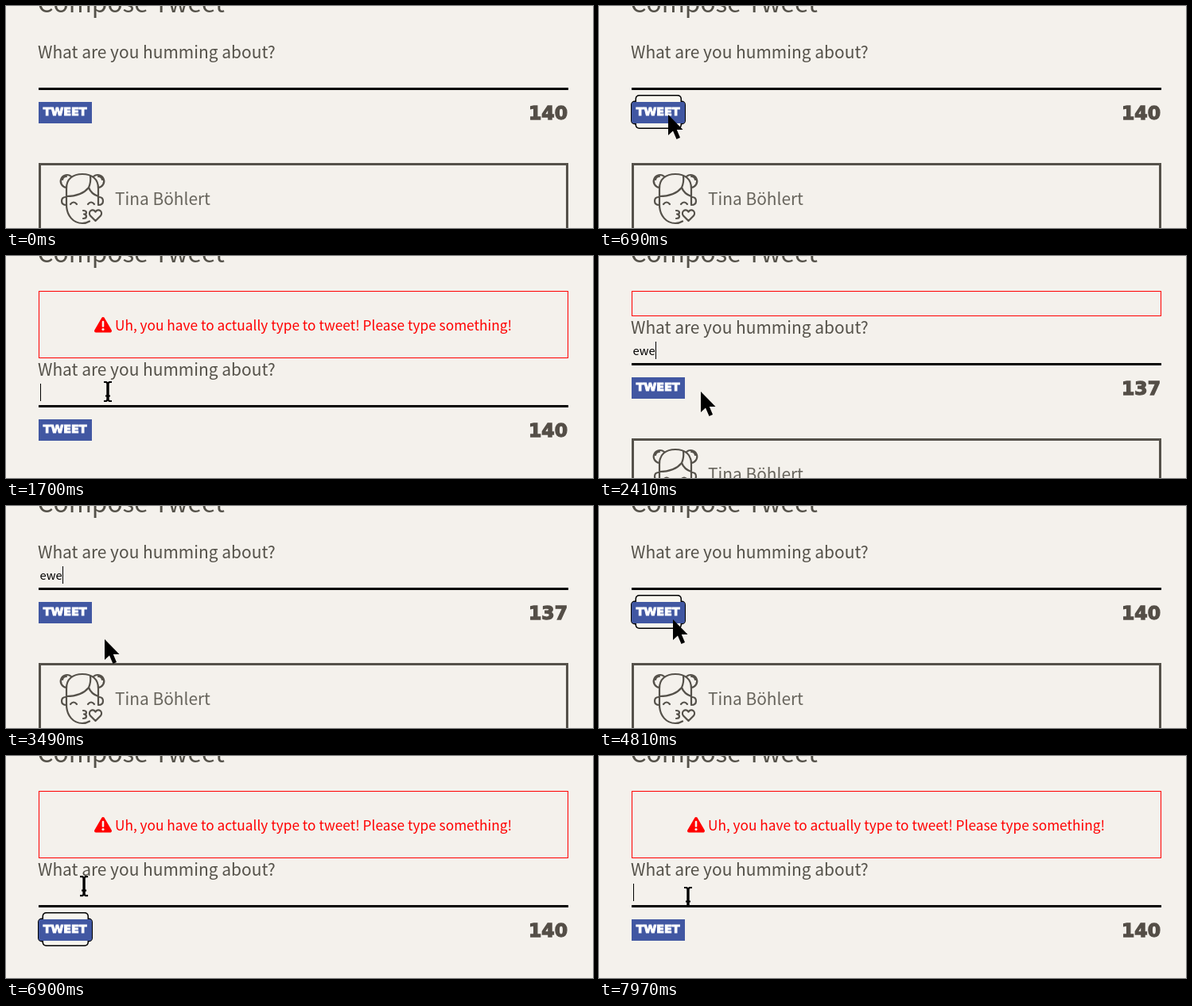
An HTML page that plays this animation: 738 px wide and 280 px high, repeating every 8000 ms.

```html
<!DOCTYPE html>
<html lang="en">
<head>
<meta charset="utf-8">
<title>Compose form</title>
<style>
  html, body { margin: 0; width: 100%; height: 100%; overflow: hidden; background: #f4f1ec; }
  svg { display: block; width: 738px; height: 280px; }
  text { font-family: "Noto Sans CJK JP", "Noto Sans CJK SC", "Noto Sans CJK", "Open Sans", sans-serif; fill: #545149; }
  .title { font-size: 31.5px; }
  .label { font-size: 20.95px; }
  .name { font-size: 20.9px; font-weight: 300; fill: #67645c; }
  .typed { font-size: 14.7px; fill: #000; }
  .warn { font-size: 17.27px; fill: #f00; }
  .block { font-family: "DejaVu Sans", sans-serif; font-weight: 700; }
  .count { font-size: 23.5px; fill: #544e47; stroke: #544e47; stroke-width: 1.3; }
  .tweet { font-size: 14.3px; fill: #fff; stroke: #fff; stroke-width: 1; }
  .art { fill: none; stroke: #55514a; stroke-width: 2.2; stroke-linecap: round; stroke-linejoin: round; }
</style>
</head>
<body>
<svg viewBox="0 0 738 280">
  <defs>
    <clipPath id="clip"><rect id="clipBox" x="41" y="44" width="666" height="0"/></clipPath>
  </defs>

  <text class="title" x="39.5" y="7.5">Compose Tweet</text>

  <g id="alert">
    <rect id="frame" x="41.5" y="44.5" width="665" height="0" fill="none" stroke="#f00"/>
    <g clip-path="url(#clip)">
      <g id="message">
        <path d="M122 79 L131 94.500 H113 Z" fill="#f00" stroke="#f00" stroke-width="4" stroke-linejoin="round"/>
        <path d="M122 83 V88.500" stroke="#f4f1ec" stroke-width="2.600" stroke-linecap="round"/>
        <circle cx="122" cy="92.500" r="1.600" fill="#f4f1ec"/>
        <text class="warn" x="137" y="94">Uh, you have to actually type to tweet! Please type something!</text>
      </g>
    </g>
  </g>

  <g id="form">
    <text class="label" x="40" y="66">What are you humming about?</text>
    <text class="typed" id="typed" x="42.500" y="93"></text>
    <rect id="caret" x="43" y="76" width="1" height="22"/>
    <rect x="41" y="103" width="666" height="3"/>

    <g id="ring">
      <rect x="40" y="119.500" width="69" height="30" rx="5"/>
      <rect x="45.500" y="112" width="58.500" height="43" rx="5"/>
      <g fill="#f8f6ef">
        <rect x="41.500" y="121" width="66" height="27" rx="4"/>
        <rect x="47" y="113.500" width="55.500" height="40" rx="4"/>
      </g>
    </g>
    <rect id="button" x="41" y="121" width="67" height="27" fill="#4157a2"/>
    <text class="block tweet" x="46.800" y="138.200">TWEET</text>
    <text class="block count" id="count" x="706" y="142.800" text-anchor="end">140</text>

    <rect x="42.500" y="199.500" width="663" height="300" fill="none" stroke="#55514a" stroke-width="3"/>
    <g class="art">
      <g id="half">
        <path d="M76 229 A8 8 0 1 1 82 215 M71 219 Q72 215 76 215"/>
        <path d="M76 250 V230 C76 218 84 212 96 212"/>
        <path d="M75 241 Q70 241 70 246 Q70 251 76 251 M81 250 Q85 245 89 250"/>
      </g>
      <use href="#half" transform="translate(192) scale(-1 1)"/>
      <path d="M76 250 C76 265 85 274 96 274 Q101 274 105 271.500"/>
      <path d="M106 214 Q107 222 104 229 M76 240 Q95 240 104 229 Q107 237 116 240"/>
      <path d="M97 258 Q101 258 101 260.500 T98 262.500 Q101 263 101 265.500 T97 268"/>
      <path d="M112.500 271 L106 264.500 C102.500 260 108.500 254 112.500 259.500 C116.500 254 122.500 260 119 264.500 Z"/>
    </g>
    <text class="name" x="137" y="251">Tina Böhlert</text>
  </g>

  <g id="cursor">
    <path id="arrow" d="M0 0 V26 L6 20.500 L10.500 31 L15 29 L10.800 19 H18.500 Z"/>
    <g id="beam" fill="none" stroke="#000">
      <path d="M0 -11 V11" stroke-width="3.400"/>
      <path d="M-5 -12 H-2 L0 -10.500 L2 -12 H5 M-5 12 H-2 L0 10.500 L2 12 H5 M-3 5.500 H3" stroke-width="2.200"/>
    </g>
  </g>
</svg>

<script>
const LOOP = 8000, SLIDE = 400, BLINK = 530;
const FULL = 85, EMPTY = 57; // alert height with and without its message
const WORD = "ewe", LIMIT = 140;

const presses = [640, 4810];  // button gains focus
const focuses = [1700, 7890]; // text field gains focus
const keys = (start, gap) => [...WORD].map((_, i) => start + i * gap);
const typing = keys(2225, 90), erasing = keys(3960, 160);

// Pointer moves: start, end, x, y
const origin = [702, 262];
const moves = [
  [70, 560, 87, 137],
  [930, 1530, 128, 171],
  [2420, 2790, 124, 168],
  [4300, 4580, 93, 143],
  [4900, 5660, 98, 164],
  [6900, 7050, 104, 168],
  [7510, 7970, 112, 178]
];

const el = id => document.getElementById(id);
const show = (id, on) => el(id).setAttribute("visibility", on ? "visible" : "hidden");
const clamp = v => Math.min(1, Math.max(0, v));
const swing = p => 0.5 - Math.cos(Math.PI * clamp(p)) / 2;
const easeOut = p => 1 - (1 - clamp(p)) ** 2;
const past = (times, t) => times.filter(v => v <= t);
const latest = (times, t) => Math.max(0, ...past(times, t));

function alertHeight(t) {
  const slide = start => swing((t - start) / SLIDE);
  if (t < typing[0]) return FULL * slide(presses[0] + 40);
  if (t < presses[1]) return EMPTY * (1 - slide(typing[0]));
  return FULL * slide(presses[1] + 50);
}

function pointer(t) {
  let [x, y] = origin;
  for (const [start, end, toX, toY] of moves) {
    const k = easeOut((t - start) / (end - start));
    x += (toX - x) * k;
    y += (toY - y) * k;
  }
  return [x, y];
}

function drawAlert(t, h) {
  const inner = Math.max(0, h - 1);
  show("alert", h > 1);
  el("frame").setAttribute("height", inner);
  el("clipBox").setAttribute("height", inner);
  el("message").setAttribute("transform", `translate(0 ${10 * (h / FULL - 1)})`);
  show("message", h > 1 && (t < typing[0] || t >= presses[1]));
}

function drawForm(t, h) {
  el("form").setAttribute("transform", `translate(0 ${h})`);
  const text = WORD.slice(0, past(typing, t).length - past(erasing, t).length);
  el("typed").textContent = text;
  el("count").textContent = LIMIT - text.length;

  const focus = latest(focuses, t), press = latest(presses, t);
  const wake = latest([...focuses, ...typing, ...erasing], t);
  show("caret", focus > press && Math.floor((t - wake) / BLINK) % 2 === 0);
  el("caret").setAttribute("x", 43 + Math.round(el("typed").getComputedTextLength()));
  show("ring", press > focus);
  el("button").setAttribute("rx", press > focus ? 3 : 0);
}

function drawCursor(t, h) {
  const [x, y] = pointer(t);
  const hidden = t < moves[0][0] || (t >= 3810 && t < erasing[2]);
  const overText = y > 44 + h && y < 105 + h;
  el("cursor").setAttribute("transform", `translate(${x} ${y})`);
  show("arrow", !hidden && !overText);
  show("beam", !hidden && overText);
}

function tick() {
  const t = performance.now() % LOOP;
  const h = Math.round(alertHeight(t));
  drawAlert(t, h);
  drawForm(t, h);
  drawCursor(t, h);
  requestAnimationFrame(tick);
}
tick();
</script>
</body>
</html>
```
